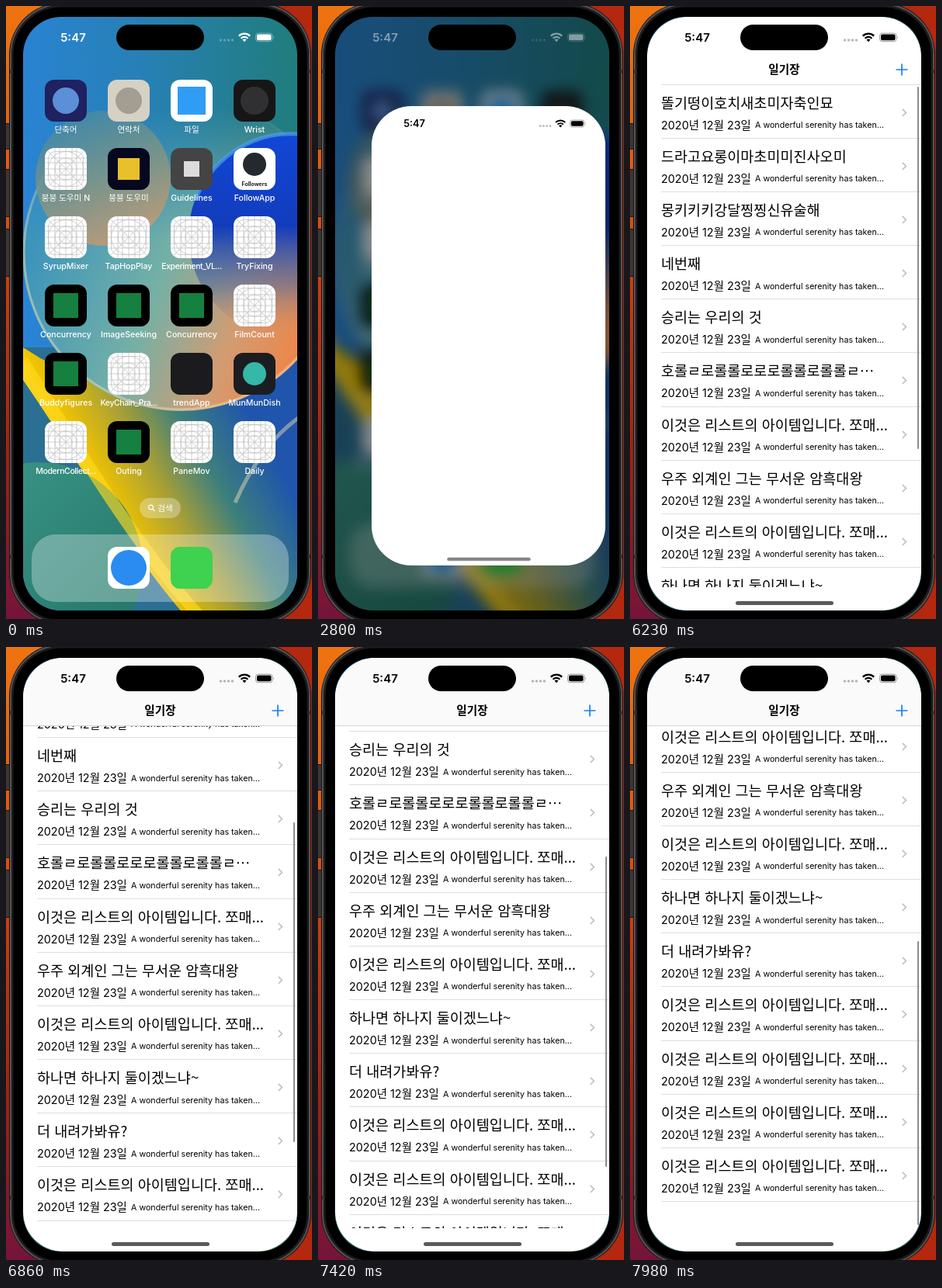
Animation of 394 by 790 pixels, one loop 8000 ms. Source, as an HTML page:

```html
<!DOCTYPE html>
<html lang="ko">
<head>
<meta charset="utf-8">
<title>일기장</title>
<style>
  html, body { margin: 0; width: 100%; height: 100%; overflow: hidden; }
  body {
    position: relative;
    background:
      linear-gradient(90deg, transparent 35%, #b3280f 85%),
      linear-gradient(#ee7410, #e2560e 30%, #c93a10 47%, #a4230f 72%, #74143a);
    font-family: Inter, "Noto Sans CJK KR", "Noto Sans CJK", sans-serif;
  }
  div, svg { position: absolute; }
  svg { overflow: visible; }
  svg text { font-family: inherit; }

  .side { left: -2px; width: 8px; background: #3d3634; box-shadow: 0 0 0 1px #1d1615; }
  #phone {
    left: 5px; top: -3px; width: 387px; height: 799px; box-sizing: border-box;
    border: 2.5px solid #535355; border-radius: 66px; background: #000;
    box-shadow: inset 0 0 0 2.5px #1d1d1f, 0 0 0 1px #1c1616;
  }
  .band { width: 3px; height: 5px; background: #333; }
  #screen {
    left: 22px; top: 14px; width: 353px; height: 765px;
    border-radius: 49px; overflow: hidden; background: #000;
  }
  .world { left: -22px; top: -14px; width: 394px; height: 790px; }
  #icons { transform-origin: 198.5px 396.5px; }
  #shade { inset: 0; background: #000; }
  #dock {
    left: 33px; top: 681px; width: 331px; height: 87px;
    border-radius: 31px; background: rgba(255, 255, 255, .3);
  }
  #search {
    left: 172px; top: 634px; width: 53px; height: 26px;
    border-radius: 13px; background: rgba(255, 255, 255, .3);
  }

  #card { overflow: hidden; background: #fff; }
  #app { left: 0; top: 0; width: 353px; height: 765px; transform-origin: 0 0; }
  #splash { left: 0; top: 0; }
  #bar {
    left: 50%; width: 126px; height: 5px; margin-left: -63px; bottom: 7px;
    border-radius: 3px; background: #5b5b5d; transform-origin: 50% 12px;
  }
  #table { left: 22px; top: 101px; width: 353px; height: 647.5px; overflow: hidden; }
  #rows { left: 0; top: 0; width: 353px; will-change: transform; }
  .row {
    left: 18px; width: 335px; height: 69.17px; box-sizing: border-box;
    border-bottom: 1px solid #dededf; color: #000; white-space: nowrap;
  }
  .title {
    left: 0; top: 8px; line-height: 28px; font-size: 18.55px;
    font-family: "Noto Sans CJK KR", "Noto Sans CJK", sans-serif;
  }
  .sub { left: 0; top: 42px; line-height: 20px; font-size: 14.4px; }
  .sub span { position: absolute; left: 121px; top: .5px; font-size: 10.7px; }
  .row svg { left: 310px; top: 30px; }
  #nav { left: 22px; top: 14px; width: 353px; height: 87px; border-bottom: 1px solid transparent; }
  #nav.over { background: #fafafa; border-color: #d2d2d4; }
  #name {
    left: 0; width: 353px; top: 57px; line-height: 22px; text-align: center;
    font-size: 14.6px; font-weight: 700; color: #000;
  }
  #thumb { left: 369.5px; width: 2.8px; border-radius: 2px; background: #8b8b8d; }
  #island { left: 142px; top: 24px; width: 113px; height: 33px; border-radius: 17px; background: #000; }
</style>
</head>
<body>
<div class="side" style="top:152px;height:32px"></div>
<div class="side" style="top:211px;height:60px"></div>
<div class="side" style="top:288px;height:60px"></div>
<div id="phone"></div>
<div class="band" style="left:5px;top:82px"></div>
<div class="band" style="left:389px;top:82px"></div>
<div class="band" style="left:5px;top:707px"></div>
<div class="band" style="left:389px;top:707px"></div>

<div id="screen"><div class="world">
  <div id="home" class="world" style="left:0;top:0">
    <svg width="394" height="790">
      <defs>
        <linearGradient id="sky" x1="0" y1=".1" x2="1" y2="0">
          <stop stop-color="#2a84da"/><stop offset=".45" stop-color="#2780b4"/>
          <stop offset="1" stop-color="#1f7c70"/>
        </linearGradient>
        <linearGradient id="orb" gradientUnits="userSpaceOnUse" x1="40" y1="290" x2="390" y2="430">
          <stop stop-color="#3c94bb"/><stop offset=".45" stop-color="#74b0a6"/>
          <stop offset=".75" stop-color="#d29c72"/><stop offset="1" stop-color="#ee8547"/>
        </linearGradient>
        <linearGradient id="fade" gradientUnits="userSpaceOnUse" x1="0" y1="130" x2="0" y2="300">
          <stop stop-color="#000"/><stop offset="1" stop-color="#fff"/>
        </linearGradient>
        <linearGradient id="sea" x1="0" y1="0" x2="0" y2="1">
          <stop stop-color="#1247d6"/><stop offset=".45" stop-color="#123cbc"/>
          <stop offset=".75" stop-color="#3f62a0" stop-opacity=".5"/>
          <stop offset="1" stop-color="#d98a60" stop-opacity="0"/>
        </linearGradient>
        <linearGradient id="ball" x1=".2" y1="0" x2=".6" y2="1">
          <stop stop-color="#3d88a8"/><stop offset=".5" stop-color="#7d9486"/>
          <stop offset="1" stop-color="#c99a70"/>
        </linearGradient>
        <linearGradient id="sun" gradientUnits="userSpaceOnUse" x1="95" y1="640" x2="310" y2="520">
          <stop stop-color="#ffe23a"/><stop offset=".14" stop-color="#f2c400"/>
          <stop offset=".42" stop-color="#a79f36"/><stop offset=".68" stop-color="#3d7f7c"/>
          <stop offset="1" stop-color="#1f55ac"/>
        </linearGradient>
        <linearGradient id="leaf" x1="0" y1="0" x2="1" y2="1">
          <stop stop-color="#3e9a8c"/><stop offset="1" stop-color="#217265"/>
        </linearGradient>
        <mask id="low" maskUnits="userSpaceOnUse" x="-40" y="0" width="480" height="800">
          <rect x="-40" width="480" height="800" fill="url(#fade)"/>
        </mask>
        <symbol id="grid" viewBox="0 0 54 54">
          <rect width="54" height="54" rx="12" fill="#fff"/>
          <g fill="none" stroke="#bcbcbe" stroke-width=".7">
            <circle cx="27" cy="27" r="8"/><circle cx="27" cy="27" r="14"/><circle cx="27" cy="27" r="22.5"/>
            <path d="M4 4 50 50M50 4 4 50M0 27H54M27 0V54M0 13H54M0 41H54M13 0V54M41 0V54M0 19H54M0 35H54M19 0V54M35 0V54"/>
            <rect x="4.5" y="4.5" width="45" height="45" rx="9"/>
          </g>
        </symbol>
      </defs>
      <rect x="-20" y="-20" width="434" height="830" fill="url(#sky)"/>
      <rect x="-20" y="440" width="434" height="370" fill="#2b6f92"/>
      <path d="M-20 380 22 440Q200 560 420 430V820H265C185 750 110 610 22 482L-20 440Z" fill="url(#sun)"/>
      <path d="M385 525Q330 560 295 640" fill="none" stroke="#f4e3b4" stroke-width="5" opacity=".45"/>
      <circle cx="42" cy="722" r="134" fill="url(#leaf)"/>
      <path d="M22 458C110 600 185 720 262 800" fill="none" stroke="#ffd91e" stroke-width="15" opacity=".65"/>
      <g mask="url(#low)">
        <circle cx="225" cy="318" r="204" fill="url(#orb)"/>
        <circle cx="225" cy="318" r="202" fill="none" stroke="#e6e0b8" stroke-width="3" opacity=".5"/>
      </g>
      <circle cx="366" cy="296" r="131" fill="url(#sea)"/>
      <path d="M244 250A131 131 0 0 1 400 169" fill="none" stroke="#4aa0ea" stroke-width="5" opacity=".7"/>
      <circle cx="125" cy="222" r="87" fill="url(#ball)" opacity=".85"/>
    </svg>
    <div id="icons" class="world" style="left:0;top:0">
      <div id="dock"></div>
      <div id="search"></div>
      <svg id="tiles" width="394" height="790" fill="#fff" font-size="10.6" font-weight="500" text-anchor="middle"></svg>
    </div>
  </div>
  <div id="shade"></div>
  <div id="homeStatus" style="left:0;top:0;color:#fff"></div>

  <div id="card">
    <div id="app"><div class="world">
      <div id="page" class="world" style="left:0;top:0">
        <div id="table"><div id="rows"></div></div>
        <div id="nav"><div id="name">일기장</div>
          <svg width="353" height="87"><path d="M320.5 68h15M328 60.5v15" stroke="#1a7df0" stroke-width="1.7"/></svg>
        </div>
        <div id="thumb"></div>
      </div>
      <div id="appStatus" style="left:0;top:0;color:#000"></div>
    </div></div>
    <svg id="splash"><use href="#grid" width="100%" height="100%"/></svg>
    <div id="bar"></div>
  </div>
  <div id="island"></div>
</div></div>

<script>
const $ = id => document.getElementById(id);
const LOOP = 8000, STEP = 70;
const ROW = 69.17, GUESS = 39.5, VIEW = 647.5, TRACK = 641;

const status = `<svg width="394" height="70" fill="currentColor">
  <text x="86.5" y="46" font-size="15" font-weight="600" text-anchor="middle">5:47</text>
  <g opacity=".28">${[277, 282, 287, 292].map(x => `<circle cx="${x - .5}" cy="44" r="1.7"/>`).join('')}</g>
  <g fill="none" stroke="currentColor" stroke-width="2.3">
    <path d="M299.8 38.6a10.3 10.3 0 0 1 14.4 0M302.6 41.7a6.3 6.3 0 0 1 8.8 0"/>
  </g>
  <path d="M307 46.2l-2.5-2.6a3.6 3.6 0 0 1 5 0z"/>
  <rect x="321.5" y="35.1" width="21.5" height="10.6" rx="3.3" fill="none" stroke="currentColor" opacity=".4"/>
  <rect x="323" y="36.6" width="18.5" height="7.6" rx="2"/>
  <path d="M344.3 38.7q1.6 1.6 0 3.4z" opacity=".5"/></svg>`;
$('homeStatus').innerHTML = $('appStatus').innerHTML = status;

// Home screen: label, tile colour, shape, shape colour, shape radius
const blank = label => [label];
const green = label => [label, '#000', 'square', '#15803f', 16];
const apps = [
  ['단축어', '#1f2160', 'circle', '#5b8fd8', 17], ['연락처', '#d5d1c5', 'circle', '#a39d92', 17],
  ['파일', '#fff', 'square', '#2f9df5', 18], ['Wrist', '#161616', 'circle', '#303032', 18],
  blank('붕붕 도우미 N'), ['붕붕 도우미', '#05081f', 'square', '#e8c02c', 14],
  ['Guidelines', '#444', 'square', '#dcdcdc', 10], ['FollowApp', '#fff', 'circle', '#24292e', 15],
  blank('SyrupMixer'), blank('TapHopPlay'), blank('Experiment_VL...'), blank('TryFixing'),
  green('Concurrency'), green('ImageSeeking'), green('Concurrency'), blank('FilmCount'),
  green('Buddyfigures'), blank('KeyChain_Pra...'), ['trendApp', '#1b1b1d'], ['MunMunDish', '#1c1d20', 'circle', '#35b8a8', 15],
  blank('ModernCollect...'), green('Outing'), blank('PaneMov'), blank('Daily')
];

function tile(x, y, [label, color, shape, ink, r]) {
  if (!color) return `<use href="#grid" x="${x - 27}" y="${y - 27}" width="54" height="54"/>`;
  const base = `<rect x="${x - 27}" y="${y - 27}" width="54" height="54" rx="12" fill="${color}"/>`;
  if (!shape) return base;
  const cy = label === 'FollowApp' ? y - 6 : y;
  return base + (shape === 'circle'
    ? `<circle cx="${x}" cy="${cy}" r="${r}" fill="${ink}"/>`
    : `<rect x="${x - r}" y="${cy - r}" width="${2 * r}" height="${2 * r}" fill="${ink}"/>`);
}

$('tiles').innerHTML = apps.map((app, i) => {
  const x = 77 + 81 * (i % 4), y = 122 + 88 * Math.floor(i / 4);
  const tight = app[0].endsWith('...') ? ' letter-spacing="-.45"' : '';
  return tile(x, y, app) + `<text x="${x}" y="${y + 41.3}"${tight}>${app[0]}</text>`;
}).join('') +
  tile(158, 724, ['', '#fff', 'circle', '#2a8cf0', 23]) +
  tile(239, 724, ['', '#3fd150']) +
  `<text x="320" y="231.5" font-size="7" font-weight="700" fill="#222">Followers</text>
  <text x="205" y="651">검색</text>
  <g fill="none" stroke="#fff" stroke-width="1.2"><circle cx="186.5" cy="646" r="2.9"/><path d="M188.7 648.2l2.8 2.8"/></g>
  <rect id="press" x="293" y="535" width="54" height="54" rx="12" fill="#000"/>`;

// List rows
const item = '이것은 리스트의 아이템입니다. 쪼매...';
const titles = [
  '똘기떵이호치새초미자축인묘', '드라고요롱이마초미미진사오미', '몽키키키강달찡찡신유술해',
  '네번째', '승리는 우리의 것', '호롤ㄹ로롤롤로로로롤롤로롤롤ㄹ⋯', item,
  '우주 외계인 그는 무서운 암흑대왕', item, '하나면 하나지 둘이겠느냐~', '더 내려가봐유?',
  item, item, item, item
];
$('rows').innerHTML =
  '<div style="left:18px;top:0;width:335px;height:1px;background:#dededf"></div>' +
  titles.map((title, i) => `<div class="row" style="top:${i * ROW + .6}px">
    <div class="title">${title}</div>
    <div class="sub">2020년 12월 23일<span>A wonderful serenity has taken...</span></div>
    <svg width="7" height="11"><path d="M.8.8 5.4 5.4.8 10" fill="none" stroke="#c2c2c5" stroke-width="1.7"/></svg>
  </div>`).join('');

const clamp = v => Math.max(0, Math.min(1, v));
const mix = (a, b, p) => a + (b - a) * p;
const smooth = u => u * u * (3 - 2 * u);

// Critically damped spring
function openAt(t) {
  if (t < 2510) return 0;
  if (t >= 3290) return 1;
  const x = (t - 2510) * .01098;
  return 1 - (1 + x) * Math.exp(-x);
}

// Drag, slow-down, then a second drag past the end
function scrollAt(t) {
  if (t <= 6370) return 0;
  if (t < 6580) return 106 * ((t - 6370) / 210) ** 1.4;
  if (t < 7420) return 306 - 114 * Math.exp((6860 - t) / 500);
  return 269 + 155 * smooth(clamp((t - 7420) / 560));
}

function drawOpening(t) {
  const p = openAt(t), card = $('card').style;
  const w = mix(54, 353, p), h = mix(54, 765, p ** 1.465), s = w / 353;
  card.display = p > 0 ? 'block' : 'none';
  card.left = mix(320, 198.5, p) - w / 2 + 'px';
  card.top = mix(562, 396.5, p) - h / 2 + 'px';
  card.width = w + 'px';
  card.height = h + 'px';
  card.borderRadius = mix(12, 51, clamp(p * 1.25)) + 'px';
  $('app').style.transform = `scale(${s})`;
  $('bar').style.transform = `scale(${s})`;
  $('bar').style.opacity = p < 1 ? mix(0, .75, clamp(p * 2 - .5)) : 1;
  $('splash').setAttribute('width', w);
  $('splash').setAttribute('height', w);
  $('splash').style.opacity = clamp(1 - 2.5 * p);
  $('press').style.opacity = t >= 2310 ? .4 : 0;
  $('home').style.filter = p > 0 && p < 1 ? `blur(${11 * p}px)` : 'none';
  $('icons').style.transform = `scale(${1 - .06 * p})`;
  $('shade').style.opacity = .5 * p;
  $('homeStatus').style.opacity = 1 - .65 * p;
  $('page').style.opacity = clamp((t - 3360) / 420);
}

function drawList(t) {
  const y = scrollAt(t);
  $('rows').style.transform = `translateY(${-y}px)`;
  $('nav').className = y > 0 ? 'over' : '';
  // Rows not yet laid out count with a guessed height
  const known = Math.min(15, Math.ceil((y + VIEW) / ROW) + (y > 0));
  const content = known * ROW + (15 - known) * GUESS;
  const over = Math.max(0, y + VIEW - content);
  const thumb = $('thumb').style;
  thumb.display = t >= 6230 ? 'block' : 'none';
  thumb.top = 104 + TRACK * (y - over) / content + over + 'px';
  thumb.height = TRACK * VIEW / content - over + 'px';
}

const start = performance.now();
function frame() {
  const now = (performance.now() - start) % LOOP;
  const t = Math.floor(now / STEP) * STEP;
  drawOpening(t);
  drawList(t);
  requestAnimationFrame(frame);
}
frame();
</script>
</body>
</html>
```
